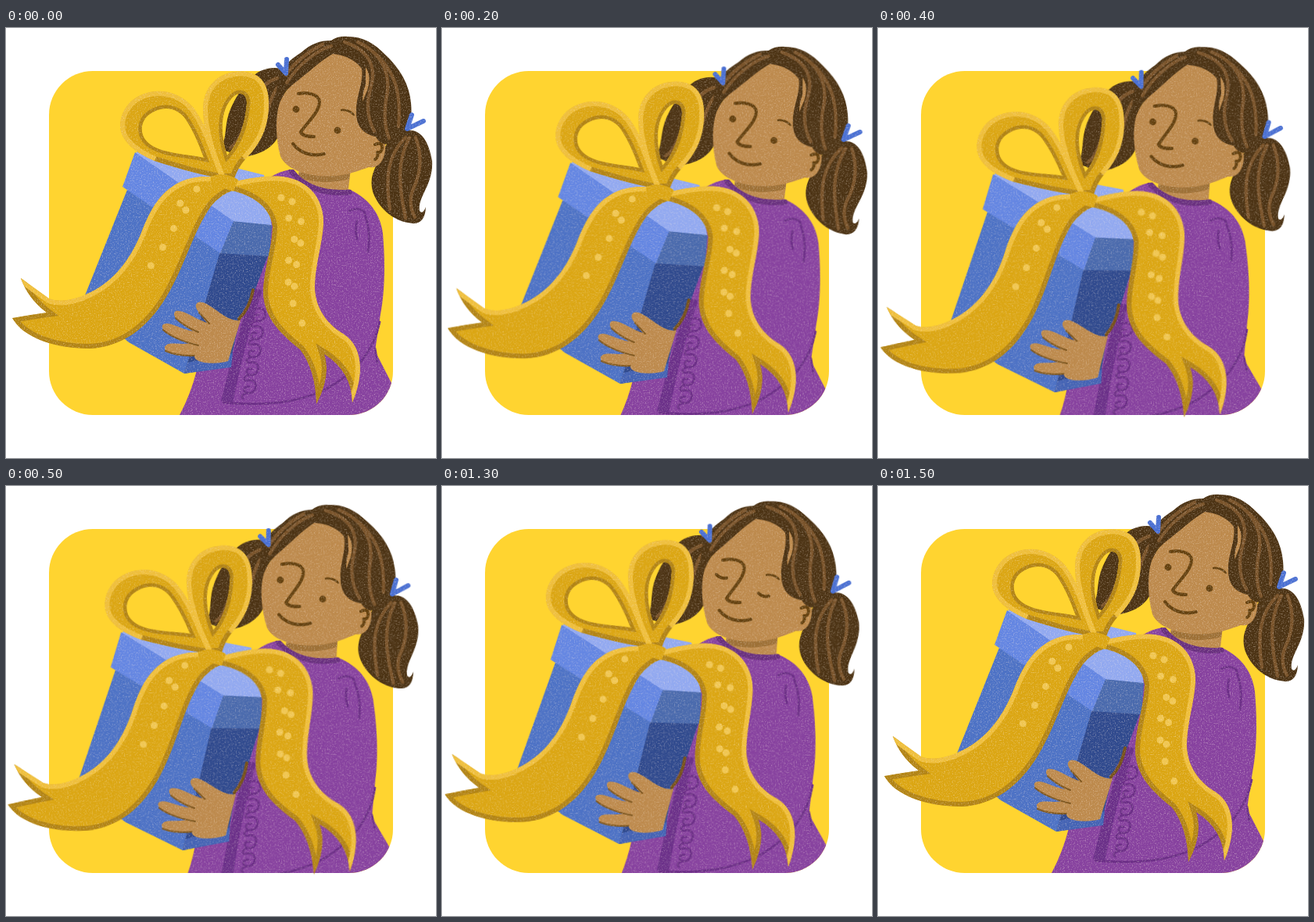
Write an HTML page that moves like this. It is 550 px wide and 550 px high and loops after 3000 ms.

```html
<!DOCTYPE html>
<html lang="en">
<head>
<meta charset="utf-8">
<title>Girl with a gift</title>
<style>
  html, body { margin: 0; width: 100%; height: 100%; overflow: hidden; background: #fff; }
  svg { display: block; width: 100%; height: 100%; }
  .line { fill: none; stroke-linecap: round; stroke-linejoin: round; }
  .ink { stroke: #64410f; stroke-width: 4; }
  .fold { stroke: #6c2f87; stroke-width: 2.8; }
  .hair { fill: #4c3314; }
  .strand { stroke: #79532a; stroke-width: 4.2; }
  .clip { stroke: #4a70d3; stroke-width: 6; }
  .skin { fill: #bd8a4d; }
  .spots { stroke: #f0c650; stroke-width: 9; stroke-dasharray: 0 28; }
</style>
</head>
<body>
<svg viewBox="0 0 550 550">
  <defs>
    <clipPath id="card"><rect x="55" y="55" width="440" height="440" rx="56"/></clipPath>
    <filter id="grain" x="0" y="0" width="1" height="1" color-interpolation-filters="sRGB">
      <feTurbulence type="fractalNoise" baseFrequency=".6" numOctaves="2" seed="4"/>
      <feColorMatrix values="0 0 0 0 1  0 0 0 0 .94  0 0 0 0 .9  1.1 0 0 0 -.56"/>
      <feComposite in2="SourceGraphic" operator="in" result="specks"/>
      <feMerge><feMergeNode in="SourceGraphic"/><feMergeNode in="specks"/></feMerge>
    </filter>
  </defs>

  <rect x="55" y="55" width="440" height="440" rx="56" fill="#ffd430"/>

  <g class="pose"><g id="head" filter="url(#grain)">
    <g id="pigLeft">
      <path class="hair" d="M358 54C342 47 322 53 313 65C300 78 287 98 283 117C280 132 281 143 276 149Q277 158 284 158Q298 168 318 162C340 155 352 142 354 116Z"/>
      <path class="line strand" d="M347 64C320 72 312 105 302 132Q296 148 287 153M350 73C332 92 335 128 310 155"/>
    </g>
    <g id="pigRight">
      <path class="hair" d="M512 131C531 128 541 146 545 170C547 200 526 216 529 234Q533 239 537 229Q536 250 521 250C500 249 479 234 470 212C462 188 475 176 485 152Q495 134 512 131Z"/>
      <path class="line strand" d="M511 140C488 163 485 190 491 232M516 140C500 170 502 200 511 243M524 140C533 164 530 188 520 208Q514 225 523 242"/>
    </g>
    <path class="skin" d="M376 175L373 192Q400 216 437 214L441 180Z"/>
    <path fill="#9d7036" d="M375 184Q408 194 440 186L439 193Q405 202 375 191Z"/>
    <path class="skin" d="M418 25C395 40 360 72 350 95C344 115 345 142 351 164C358 180 382 189 410 189C436 189 450 183 464 178C479 181 487 164 485 146L475 80L450 35Z"/>
    <path class="hair" d="M352 61C355 46 366 39 378 31C390 20 402 16 416 16Q424 10 438 11C456 11 471 19 486 35C506 54 516 74 518 96Q520 117 514 131Q502 138 490 149Q477 149 473 139C455 135 448 124 448 108C447 88 458 69 455 52Q443 36 418 33C402 42 387 57 367 72Q352 84 347 105Q342 78 352 61Z"/>
    <path class="line strand" d="M416 23C396 29 373 48 359 70M405 21C385 31 370 43 358 60M433 18C463 28 474 48 467 74C461 95 461 113 471 132M450 18C485 34 493 64 486 92Q482 122 490 141M469 30C497 53 506 82 502 126"/>
    <path class="skin" d="M460 50Q468 62 462 80L456 94Q456 83 460 72Z"/>
    <path class="line clip" d="M348 47L358 58L359 40M519 111L513 129L534 119"/>
    <g class="line ink">
      <path d="M374 84C384 82 401 84 401 95C400 108 387 119 377 133Q379 139 394 139"/>
      <path d="M367 148C376 160 391 165 407 161"/>
      <path d="M429 105Q438 104 445 111" stroke-width="2.5"/>
      <path d="M472 149Q482 145 481 154Q480 160 475 159Q477 165 472 168"/>
      <path id="eyesShut" d="M365 102Q370 108 378 107M418 128Q424 134 431 132"/>
    </g>
    <g id="eyesOpen" fill="#64410f"><circle cx="371" cy="104" r="4.4"/><circle cx="424" cy="131" r="4.4"/></g>
  </g></g>

  <g clip-path="url(#card)"><g class="pose" filter="url(#grain)">
    <path fill="#87429f" d="M325 200Q346 183 365 181C380 201 406 210 440 207C466 219 479 239 482 263C485 297 485 335 479 366Q475 393 472 413L494 456L510 530H205L222 495Q236 469 244 438L317 332Z"/>
    <path class="line" stroke="#69307f" stroke-width="7" d="M365 183C380 203 406 213 439 210"/>
    <path fill="#6b3089" d="M315 333L328 335Q306 400 290 480L275 477Q294 400 315 333Z"/>
    <path class="line fold" d="M278 479C333 484 374 479 409 462C448 441 471 411 478 376M439 234Q451 228 459 236M449 247Q446 258 449 270M459 238Q467 260 463 286M472 410L475 428"/>
    <path id="lace" class="line fold"/>
  </g></g>

  <g class="pose" filter="url(#grain)">
    <path fill="#4d72c5" d="M157 202L285 270L274 300L228 442L157 402L97 352Z"/>
    <path fill="#304a8e" d="M275 282L337 286L319 334L300 368L286 432L228 442Z"/>
    <path fill="#4463b4" d="M232 428L290 416L288 434L228 442Z"/>
    <path fill="#92a9f0" d="M168 157L258 170L330 188L340 254L291 250L164 165Z"/>
    <path fill="#4a6aad" d="M289 247L340 252L337 292L273 288Z"/>
    <path fill="#6486e2" d="M165 159L291 247L274 288L149 203Z"/>
    <path class="line" stroke="#76511b" stroke-width="4" d="M316 335Q312 358 298 372"/>
    <path class="skin" d="M300 374C282 376 268 357 252 351C242 348 240 357 247 364L257 377C243 373 228 360 217 362Q211 367 222 376L239 388C222 385 210 375 201 379C195 385 212 396 235 403C220 406 207 400 203 408C202 418 220 418 241 420C241 429 268 431 284 426Z"/>
    <path class="line" stroke="#805921" stroke-width="2" d="M217 371Q228 382 246 389M201 386Q214 398 246 406M204 413Q220 420 241 419M247 364L260 378"/>
  </g>

  <g class="pose" id="ribbons" filter="url(#grain)"></g>
</svg>

<script>
const $ = id => document.getElementById(id);

// A ribbon is its upper edge plus its lower edge, with an optional hole and rows of spots.
const ribbons = [
  { id: 'tailLeft',
    top: 'M292 199C274 188 249 188 230 194C199 205 185 231 173 262C158 299 134 330 94 344Q70 352 55 346L19 320',
    low: '19 320Q28 346 52 364Q30 367 8 371C22 396 62 410 107 410C148 408 180 385 205 344C229 304 238 263 262 228Q274 213 292 207',
    spots: 'M244 206Q222 222 208 242M230 233C206 265 200 290 171 321' },
  { id: 'tailRight',
    top: 'M280 199C308 193 330 188 353 190C389 194 407 221 406 250C405 275 395 304 395 331C395 355 408 377 431 391C456 406 459 442 443 479',
    low: '443 479Q442 439 407 417Q416 445 397 481Q396 437 376 411C347 388 330 368 329 338C329 310 341 280 341 254C338 226 310 211 280 206',
    spots: 'M352 217Q362 240 369 271Q358 298 361 324Q362 352 388 393M366 222Q384 250 377 275Q370 300 368 348' },
  { id: 'loopLeft',
    top: 'M280 191C267 161 260 129 239 101C223 83 199 76 177 84C158 90 146 107 146 126C147 145 166 160 190 170',
    low: '190 170Q246 188 280 193',
    hole: 'M253 166C230 161 204 161 186 150C169 139 171 119 184 110C201 98 220 102 230 117Q242 135 253 166Z' },
  { id: 'loopRight',
    top: 'M275 192C262 162 252 132 252 104C252 76 270 59 292 56C323 52 337 70 336 98C336 132 321 153 306 168',
    low: '306 168Q297 178 292 192L275 192',
    hole: 'M283 163C274 137 274 108 287 92C296 80 308 82 308 96C306 121 299 145 283 163Z' },
];

const drawRibbon = ({ id, top, low, hole = '', spots = '' }) => {
  const shape = `${top}L${low}Z${hole}`;
  return `<g id="${id}">
    <clipPath id="${id}Clip"><path d="${shape}" clip-rule="evenodd"/></clipPath>
    <g clip-path="url(#${id}Clip)" fill="none">
      <path d="${shape}" fill="#dba613"/>
      <path d="M${low}" stroke="#b28415" stroke-width="12"/>
      <path d="${hole}" stroke="#b28415" stroke-width="9"/>
      <path d="${top}" stroke="#efbf3c" stroke-width="12"/>
    </g>
    <path class="line spots" d="${spots}"/>
  </g>`;
};

$('ribbons').innerHTML = ribbons.map(drawRibbon).join('') +
  '<path d="M262 190Q279 183 297 194L291 209Q276 204 262 199Z" fill="#dba613"/>';

$('lace').setAttribute('d', Array.from({ length: 5 }, (_, i) =>
  `M${320 - i * 3} ${359 + i * 23}c15 -4 15 15 3 16c-9 0 -8 -10 0 -8m-3 8q-9 2 -5 7`).join(''));

const clamp = v => Math.min(1, Math.max(0, v));
const groups = document.querySelectorAll('.pose');
const turn = (id, angle, x, y) => $(id).setAttribute('transform', `rotate(${angle} ${x} ${y})`);
const show = (id, on) => { $(id).style.display = on ? '' : 'none'; };

// She sinks with the gift, the loose parts swing after her, then she rises evenly.
function setPose(step) {
  const sinking = step < 8;
  const k = sinking ? clamp(step / 3) : clamp((15 - step) / 3);
  const drop = sinking ? k ** 1.5 : k;
  const lean = sinking ? k ** 8 : k;
  const swing = step < 6 ? 2 * Math.sin(Math.PI * step / 6) : 0;

  for (const g of groups) {
    g.setAttribute('transform', `translate(${-2 * lean} ${24 * drop}) rotate(${-3.2 * lean} 228 442)`);
  }
  turn('head', swing * .4, 400, 240);
  turn('pigLeft', swing / 2, 355, 60);
  turn('pigRight', swing, 515, 130);
  turn('tailLeft', .3 * k - swing * lean * .3, 285, 197);
  turn('tailRight', swing * lean * .65, 285, 197);

  const shut = step === 7 || step === 13;
  show('eyesShut', shut);
  show('eyesOpen', !shut);
}

let current;
function draw() {
  const step = Math.floor(performance.now() % 3000 / 100);
  if (step !== current) setPose(current = step);
  requestAnimationFrame(draw);
}
draw();
</script>
</body>
</html>
```
